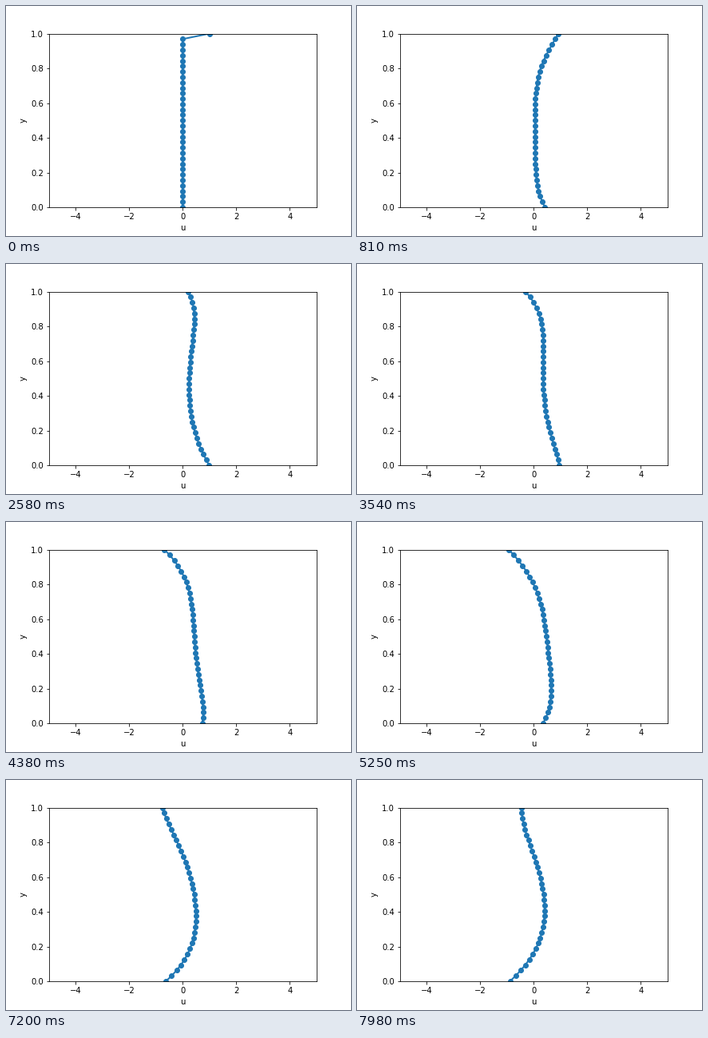
Recreate the animation shown at these times as a matplotlib script. Size 432 by 288 pixels, loop 8 s.

```python
import numpy as np
import matplotlib.pyplot as plt
from matplotlib.animation import FuncAnimation

LOOP_MS = 8000
FRAMES = 267
CELLS = 32
NU = 0.03        # viscosity
FORCE = 0.1      # constant driving force
R = 0.49         # diffusion number, just below the stability limit

y = np.linspace(0, 1, CELLS + 1)
dt = R * (y[1] - y[0]) ** 2 / NU


def solve():
    """Channel flow between two oscillating walls, one row per step."""
    rows = np.zeros((FRAMES, y.size))
    rows[0, -1] = 1
    for n in range(1, FRAMES):
        old, new = rows[n - 1], rows[n]
        new[1:-1] = old[1:-1] + R * np.diff(old, 2) + FORCE * dt
        new[0] = np.sin(n * dt)
        new[-1] = np.cos(n * dt)
    return rows


profiles = solve()

fig = plt.figure(figsize=(6, 4), dpi=72, facecolor="white")
fig.subplots_adjust(left=0.125, right=0.9, bottom=0.125, top=0.88)
ax = fig.add_subplot(xlim=(-5, 5), ylim=(0, 1), xlabel="u", ylabel="y")
line, = ax.plot(profiles[0], y, "o-", lw=2)


def draw(n):
    line.set_xdata(profiles[n])
    return line,


anim = FuncAnimation(fig, draw, frames=FRAMES, interval=LOOP_MS / FRAMES,
                     init_func=lambda: draw(0), repeat=True, repeat_delay=0)
plt.show()
```
